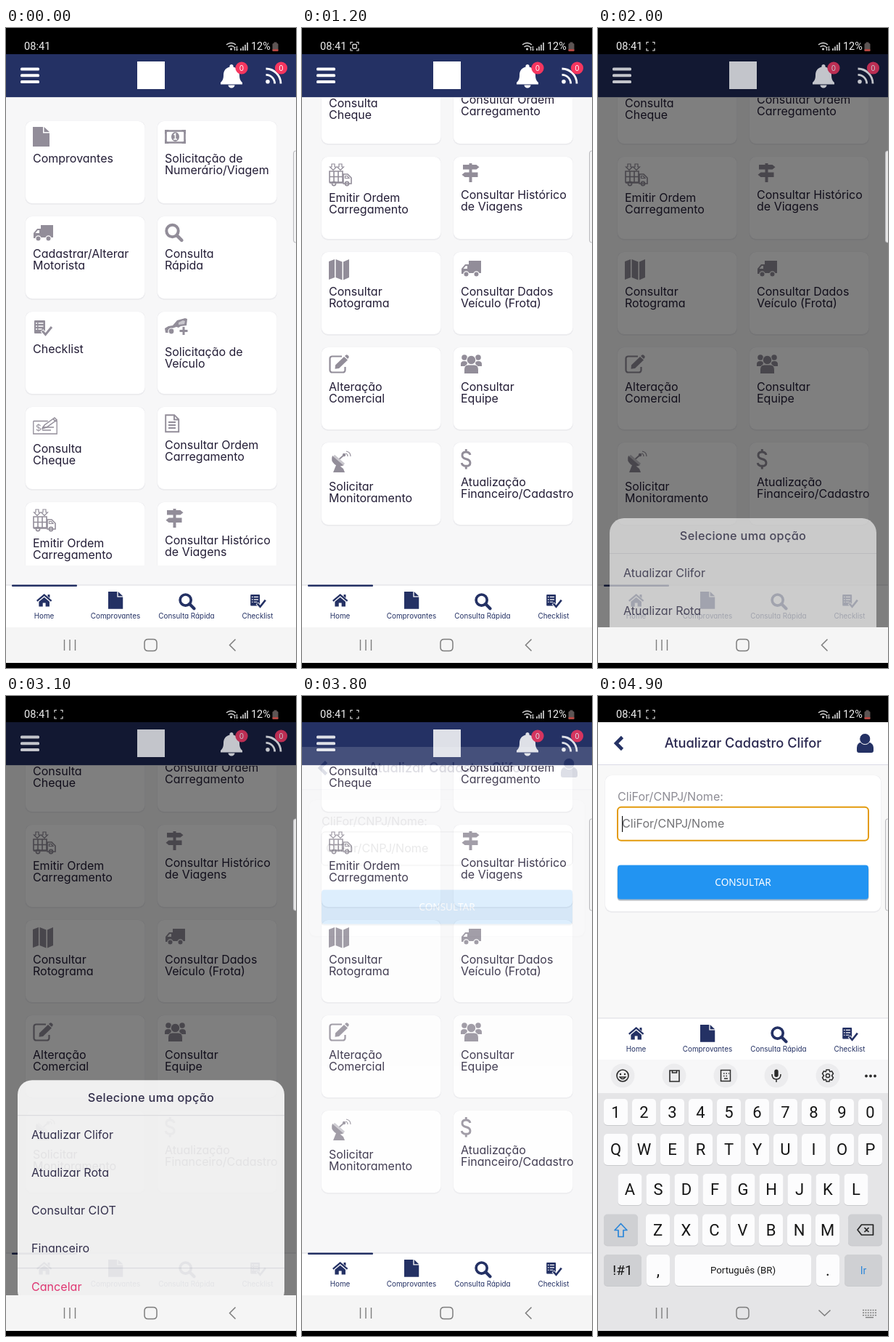
An HTML page for the animation above (5100 ms loop, 400 px wide and 880 px high).

```html
<!DOCTYPE html>
<html lang="pt-BR">
<head>
<meta charset="utf-8">
<title>App</title>
<style>
html, body { margin: 0; width: 100%; height: 100%; overflow: hidden; background: #000; }
svg { display: block; width: 100vw; height: 100vh; fill: currentColor; }
text { font-family: Inter, "Open Sans", sans-serif; font-feature-settings: "cv11"; white-space: pre; }
.sys { font-family: Roboto, "Noto Sans", sans-serif; }
.noto { font-family: "Noto Sans", "Open Sans", sans-serif; }
.mid { text-anchor: middle; }
.med { font-weight: 500; }
.o { fill: none; stroke: currentColor; }
</style>
</head>
<body>
<svg id="stage" viewBox="0 0 400 880" xmlns="http://www.w3.org/2000/svg"></svg>
<script>
const NAVY = '#243164', GREY = '#928d99', INK = '#231d36', PAGE = '#f7f7f8';
const LOOP = 5100, STEP = 100;

const rect = (x, y, w, h, r, fill, more = '') =>
  `<rect x="${x}" y="${y}" width="${w}" height="${h}" rx="${r}" fill="${fill}" ${more}/>`;
const dot = (x, y, r, fill = 'currentColor', more = '') =>
  `<circle cx="${x}" cy="${y}" r="${r}" fill="${fill}" ${more}/>`;
const shape = (d, more = '') => `<path d="${d}" ${more}/>`;
const line = (d, w = 2, more = '') => `<path class="o" d="${d}" stroke-width="${w}" ${more}/>`;
const ring = (x, y, r, w) => `<circle class="o" cx="${x}" cy="${y}" r="${r}" stroke-width="${w}"/>`;
const text = (x, y, s, size, fill, cls = '', more = '') =>
  `<text x="${x}" y="${y}" font-size="${size}" fill="${fill}" class="${cls}" ${more}>${s}</text>`;
const put = (x, y, color, body, k = 1) =>
  `<g transform="translate(${x} ${y}) scale(${k})" color="${color}">${body}</g>`;
const layer = (id, body) => `<g id="${id}">${body}</g>`;
const card = (x, y, w, h) =>
  rect(x - .5, y - .3, w + 1, h + 2, 9, '#ebebee') + rect(x, y, w, h, 9, '#fff');
const wheel = (x, y, r = 3.2) => dot(x, y, r, 'currentColor', 'stroke="#fff" stroke-width="1.2"');

const icon = {
  file: shape('M0 0h14v8.500h9V27H0zM15.500 0l7.500 7h-7.500z'),
  money: line('M1.500 5.500h26v16h-26z', 2.6) + shape('M0 4h6l-6 6zM29 4h-6l6 6zM0 23h6l-6-6zM29 23h-6l6-6z') +
    `<ellipse cx="14.500" cy="13.500" rx="5.500" ry="6.500"/>` + line('M12.500 11l2-1.500v7.500m-2.500 0h5', 1.6, 'style="stroke:#fff"'),
  truck: shape('M11 4h17v17H11zM10 9H6l-5 6v7h10V9z') + shape('M3.500 15l3.300-4H9v4z', 'fill="#fff"') +
    wheel(7.5, 22.5, 3.6) + wheel(21.5, 22.5, 3.6),
  search: ring(10.5, 12, 8.2, 4) + line('M16.500 18l6.800 6.800', 4.6, 'stroke-linecap="round"'),
  list: rect(2, 4, 15, 18, 1, 'currentColor') +
    line('M4 8h2m1.500 0h7M4 12h2m1.500 0h7M4 16h2m1.500 0h5', 1.4, 'style="stroke:#fff"') +
    line('M12.500 18l5 5.500 9-11', 5, 'style="stroke:#fff"') + line('M13 18.500l4.500 5 8.500-10.500', 3),
  car: shape('M0 15l5-3 6-1 6-7 11-3 3 1-1 9-8 1-3 2-3-1-6 2v6H1z') + wheel(9, 19, 4) +
    shape('M19 7l6-3 3 1-1 4-8 1z', 'fill="#c9c7cd"') + line('M26 13v11m-5.500-5.500h11', 3),
  cheque: line('M.800 11.500h20m9 0h3.400V29H.800V11.500M13 20h16M13 24h12', 1.3) +
    line('M13 22l3-5L30 7l3 3-14 10zM28 8.500l3 3', 1.5) + text(4, 25, '$', 12, 'currentColor'),
  doc: line('M1.200 3.200h12l6 6v17h-18zM13 3.500V9.500h6M5 13h10M5 17h10M5 21h10', 1.9),
  load: line('M1 12h18v15H1zM1 19.500h18M7 12v15M13 12v15M20 16h6l5 5v8H20zM1 28h18', 1.6) +
    shape('M4 2h4v4h2.500L6 10.500 1.500 6H4zM14 2h4v4h2.500L16 10.500 11.500 6H14z', 'class="o" stroke-width="1.2"') +
    line('M22.500 18.500h3l2.500 3h-5.500z', 1.2) + ring(7, 29, 2.6, 1.6) + ring(25, 29, 2.6, 1.6),
  sign: shape('M11.500 1h4v26h-4z') + shape('M3 3h18.500l4 3.200-4 3.300H3zM23.500 13.500H5.500l-4 3.200 4 3.300h18z'),
  map: shape('M0 5l8-3v25l-8 3zM9.500 2l9 3.500v25l-9-3.500zM20 5.500l8-3.500v25l-8 3.500z'),
  edit: line('M18 4.500H4.500a3 3 0 0 0-3 3v16a3 3 0 0 0 3 3h15a3 3 0 0 0 3-3V19', 2.2) +
    shape('M9 16.500L21 5l5 4.500L14 21l-5.500.800zM22 4l1.700-1.500q1.200-.700 2.300.300l1.300 1.300q1 1.200 0 2.300L26 8z'),
  team: dot(5, 6, 3.8) + dot(24, 6, 3.8) + shape('M0 18v-3q0-4 5-4 3 0 4 2l-1 5zM29 18v-3q0-4-5-4-3 0-4 2l1 5z') +
    dot(14.5, 9.5, 6.2, 'currentColor', 'stroke="#fff"') +
    shape('M4.500 28.500V23q0-7 6-7h8q6 0 6 7v5.500z', 'stroke="#fff" stroke-width="1"'),
  dish: shape('M5 10q-3 7 3 12 6 4.500 13 1zM10 23l-4 10h16l-2-5-5-4z') + line('M13 16l8-7', 1.8) + dot(21, 9, 2.2) +
    line('M7 10l14 12', 3, 'style="stroke:#c9c7cd"') + line('M23 7q3 .500 3 4M24 4q6 1 6 7', 1.2),
  dollar: line('M13 9q-1-4-5.800-4Q2 5 2 9.500q0 3.700 5 5 6 1.300 6 5.500 0 4.300-5.500 4.300-5.500 0-6.300-4.300M7.300 1v4m0 19v4.500', 2.9),
  home: shape('M11 0l11 9.300-1.500 1.700L11 3 1.500 11 0 9.300zM11 4.800l7.500 6.300V18H13v-5H9v5H3.500v-6.900zM16 1h3v5l-3-2.500z')
};

// icon, first baseline, lines
const cards = [
  ['file', 57, 'Comprovantes'], ['money', 57, 'Solicitação de', 'Numerário/Viagem'],
  ['truck', 57, 'Cadastrar/Alterar', 'Motorista'], ['search', 57, 'Consulta', 'Rápida'],
  ['list', 57, 'Checklist'], ['car', 61, 'Solicitação de', 'Veículo'],
  ['cheque', 63, 'Consulta', 'Cheque'], ['doc', 58, 'Consultar Ordem', 'Carregamento'],
  ['load', 62, 'Emitir Ordem', 'Carregamento'], ['sign', 58, 'Consultar Histórico', 'de Viagens'],
  ['map', 60, 'Consultar', 'Rotograma'], ['truck', 60, 'Consultar Dados', 'Veículo (Frota)'],
  ['edit', 60, 'Alteração', 'Comercial'], ['team', 60, 'Consultar', 'Equipe'],
  ['dish', 66, 'Solicitar', 'Monitoramento'], ['dollar', 60, 'Atualização', 'Financeiro/Cadastro']
];
const menu = cards.map(([name, base, ...rows], i) => {
  const x = i % 2 ? 209 : 27, y = 128 + (i >> 1) * 131;
  return card(x, y, 164.5, 113) + put(x + 10, y + 8, GREY, icon[name]) +
    rows.map((s, n) => text(x + 10, y + base + n * 15.6, s, 16, INK)).join('');
}).join('');

const badge = x => dot(x, 55, 8.6, '#f5365f') + text(x, 58.6, '0', 10, '#fff', 'mid');
const headIcons = put(0, 0, '#fff',
  [54.5, 63.2, 72].map(y => rect(20, y, 26, 4, 1.5, '#fff')).join('') +
  rect(181, 46, 38, 38, 0, '#fff') +
  shape('M311 50a3 3 0 0 1 2.500 3.500c6 1.500 8.500 6 8.500 11.500 0 6 2 8 4 10v2.500h-30V75c2-2 4-4 4-10 0-5.500 2.500-10 8.500-11.500A3 3 0 0 1 311 50zM306.500 78.500h9a4.500 4 0 0 1-9 0z') +
  dot(361, 73.8, 2.8) + line('M358.500 64.300a12.200 12.200 0 0 1 12.200 12.200M358.500 56a20.500 20.500 0 0 1 20.500 20.500', 2.8) +
  badge(325) + badge(379.5));

const homePage = rect(0, 36, 400, 790, 0, PAGE) +
  `<g clip-path="url(#list)">${layer('menu', menu)}</g>` +
  rect(0, 36, 400, 60, 0, '#dcdde6') + rect(0, 36, 400, 59, 0, NAVY);

const formPage = rect(0, 36, 400, 840, 0, '#f8f8f8') + rect(0, 36, 400, 58, 0, '#fff') +
  rect(0, 94, 400, 1, 0, '#dadae6') +
  put(0, 0, NAVY, line('M33.500 56.500l-8.500 8.500 8.500 8.500', 4.6) +
    shape('M357 75v-4q0-6 6-7.500h10q7 1.500 7 7.500v4q0 3-3 3h-17q-3 0-3-3z') + dot(368.3, 59, 7.6, 'currentColor', 'stroke="#fff"')) +
  text(200, 71, 'Atualizar Cadastro Clifor', 18.3, '#2a2850', 'mid med') +
  card(10, 109, 380, 187) +
  text(27, 144, 'CliFor/CNPJ/Nome:', 16.1, '#8e8d95') +
  rect(27, 152.8, 346, 46, 5, '#fff', 'id="field"') +
  text(33, 181, 'CliFor/CNPJ/Nome', 16.1, '#747477') +
  rect(33, 165, 1.2, 22, 0, '#111', 'id="caret"') +
  rect(26.5, 234, 347, 47.5, 4.5, '#b5bcc4') + rect(27, 232.5, 346, 47, 4, '#2294f2') +
  text(200, 261, 'CONSULTAR', 13.6, '#fff', 'mid noto');

const tab = (x, s) => text(x, 811.7, s, 9.9, NAVY, 'mid');
const tabs = rect(0, 766, 400, 60, 0, '#fff') + rect(0, 765.5, 400, 1, 0, '#dcdce2') +
  rect(8, 765.5, 90, 2.5, 1, NAVY, 'id="mark"') +
  put(42, 778, NAVY, icon.home, .97) + put(141, 775, NAVY, icon.file, .88) +
  put(238, 775.5, NAVY, icon.search, .92) + put(335.5, 775.5, NAVY, icon.list, .86) +
  tab(52.5, 'Home') + tab(151, 'Comprovantes') + tab(249, 'Consulta Rápida') + tab(347, 'Checklist');

const SHEET_Y = 498, SHEET_H = 310;
const options = ['Atualizar Clifor', 'Atualizar Rota', 'Consultar CIOT', 'Financeiro'];
const sheet = rect(16, SHEET_Y, 368, SHEET_H, 20, '#fff') +
  text(200, SHEET_Y + 30, 'Selecione uma opção', 16.3, '#2a2646', 'mid med', 'letter-spacing=".3"') +
  rect(16, SHEET_Y + 48, 368, 1, 0, '#e3e3e8') + rect(16, SHEET_Y + 258, 368, 1, 0, '#e3e3e8') +
  options.map((s, i) => text(35, SHEET_Y + 80.5 + i * 52, s, 16.1, '#2a2646')).join('') +
  text(35, SHEET_Y + 290, 'Cancelar', 16.1, '#ee2f72');

const key = (x, y, w, h, s = '', fill = '#fcfcfd', size = 22, color = '#161616') =>
  rect(x, y + 1, w, h, 5, '#c9cacd') + rect(x, y, w, h, 5, fill) +
  text(x + w / 2, y + h / 2 + size * .36, s, size, color, 'mid sys');
const keyRow = (s, x, y, h) => [...s].map((c, i) => key(x + i * 39, y, 33, h, c)).join('');
const toolIcons = ring(34, 522, 8, 1.6) + dot(31, 520, 1.2) + dot(37, 520, 1.2) + line('M30 524q4 5 8 0z', 1.4) +
  line('M99 515h13v15H99zM102.500 515v3h6v-3', 1.6) +
  line('M169.500 514.500h13v15h-13zM173 519h1.500m2 0h1.500m2 0h1M173 522.500h1.500m2 0h1.500M174 526h5', 1.5) +
  rect(243.3, 513.5, 5.4, 10.5, 2.7, 'currentColor') + line('M240 520q0 7 6 7t6-7M246 527v4', 1.5) +
  ring(317, 522, 2.6, 1.5) + line('M315 514h4l.800 2.600 2.700-.800 2 3.500-2 2.700 2 2.700-2 3.500-2.700-.800-.800 2.600h-4l-.800-2.600-2.700.800-2-3.500 2-2.700-2-2.700 2-3.500 2.700.800z', 1.5) +
  dot(370, 522.5, 1.9) + dot(376, 522.5, 1.9) + dot(382, 522.5, 1.9);
const keyboard = rect(0, 500, 400, 374, 0, '#e5e5e7') + rect(0, 500, 400, 46, 0, '#f7f7f8') +
  [34, 105, 176, 246, 317].map(x => dot(x, 522, 16.5, '#ececee')).join('') + put(0, 0, '#2b2b2b', toolIcons) +
  keyRow('1234567890', 8, 554, 36) + keyRow('QWERTYUIOP', 8, 602, 43) +
  keyRow('ASDFGHJKL', 27.5, 657, 43) + keyRow('ZXCVBNM', 66, 712.5, 43) +
  key(8, 712.5, 47, 43, '', '#cfd0d3') + key(345, 712.5, 47, 43, '', '#cfd0d3') +
  key(8, 768, 52, 43, '!#1', '#cfd0d3', 19) + key(67, 768, 32, 43, ',') +
  key(106, 768, 188, 43, 'Português (BR)', '#fcfcfd', 13.3) + key(301, 768, 32, 43, '.') +
  key(340, 768, 52, 43, 'Ir', '#cfd0d3', 14, '#2b86d9') +
  put(0, 0, '#2b86d9', line('M31.500 725.500l8.500 9h-5v9h-7v-9h-5z', 1.7, 'stroke-linejoin="round"')) +
  put(0, 0, '#222', line('M358 734l5.500-7h16v14h-16zM367.500 731l6 6m0-6l-6 6', 1.7, 'stroke-linejoin="round"'));

const navBar = rect(0, 824, 400, 50, 0, '#f5f5f5', 'id="navBack"') +
  put(0, 0, '#7d7d7d',
    line('M80.500 841v15M88 841v15M95.500 841v15', 1.4) +
    line('M196 840.500h7q5 0 5 5v6q0 5-5 5h-7q-5 0-5-5v-6q0-5 5-5z', 1.5) +
    layer('back', line('M316.500 840.500l-8 8 8 8', 1.5)) +
    layer('down', line('M304.500 844.500l8 7.500 8-7.500', 1.5) +
      line('M365 844.500h19M365 848h19M365 851.500h19', 1.6, 'stroke-dasharray="2 1.400"') + line('M369 854.500h11', 1.4))) +
  rect(0, 873, 400, 7, 0, '#000');

const statusBar = rect(0, 0, 400, 36, 0, '#000') + text(25, 30, '08:41', 14.6, '#eee', 'sys') +
  put(0, 0, '#ddd',
    layer('rec', line('M67 22.500v-3h3M75 19.500h3v3M78 28v3h-3M70 31h-3v-3', 1.2) +
      layer('recDot', rect(69.8, 22.5, 5.5, 5.5, 1, 'none', 'stroke="#ddd" stroke-width="1.3"'))) +
    line('M304 23q6.500-5 13 0M306.500 26q4-3.200 8 0', 1.5) + dot(310.5, 29, 1.5) +
    line('M315.500 31v-5m-1.500 1.500l1.500-1.500 1.500 1.500M318.500 25v6m-1.500-1.500l1.500 1.500 1.500-1.500', 1) +
    line('M324 31v-3M327 31v-5.500M330 31v-8', 1.6) + line('M333 31V20', 1.6)) +
  text(338, 30, '12%', 14.4, '#eee', 'sys') +
  rect(367.5, 21, 8, 11, 1.5, '#5d5554') + rect(369.5, 19.5, 4, 2, 0, '#5d5554') + rect(367.5, 29, 8, 3, 1, '#b54742');

const stage = document.getElementById('stage');
stage.innerHTML = '<defs><clipPath id="list"><rect y="95" width="400" height="644"/></clipPath></defs>' +
  layer('home', homePage) + layer('form', formPage) + layer('tabs', tabs) +
  rect(0, 36, 400, 788, 0, '#000', 'id="dim"') + layer('headIcons', headIcons) +
  layer('sheet', sheet) + layer('keys', keyboard) + navBar + statusBar +
  rect(396.5, 169, 8, 126, 3, '#f3f3f4', 'stroke="#b9b9bd" stroke-width="1" id="handle"');

const el = id => document.getElementById(id);
const set = (id, attrs) => { for (const k in attrs) el(id).setAttribute(k, attrs[k]); };
const show = (id, on) => set(id, { visibility: on ? 'visible' : 'hidden' });
const span = (t, from, to) => Math.min(1, Math.max(0, (t - from) / (to - from)));
const smooth = p => p * p * (3 - 2 * p);

function draw(t) {
  set('menu', { transform: `translate(0 ${-475 * smooth(span(t, 130, 400))})` });

  const open = span(t, 1800, 2150), close = span(t, 3050, 3350);
  const drop = 1 - open ** 1.5 + close ** 1.3;
  const dim = span(t, 1650, 1900) * (1 - span(t, 3100, 3400) ** 1.2);
  set('sheet', { transform: `translate(0 ${SHEET_H * drop})`, opacity: open ** .9 * (1 - close ** 1.2) });
  set('dim', { opacity: .5 * dim });
  set('handle', { fill: dim > .5 ? '#e6e6e6' : '#f3f3f4' });

  const page = smooth(span(t, 3720, 4050));
  set('form', { opacity: page, transform: `translate(0 ${40 * (1 - page)})` });
  set('headIcons', { opacity: (1 - .25 * dim) * (1 - page) });
  show('mark', page < .5);

  const focus = t >= 4400;
  set('field', { stroke: focus ? '#e39a0c' : '#a3a3a8', 'stroke-width': focus ? 2 : 1 });
  show('caret', t >= 4900);

  const rise = 1 - (1 - span(t, 4350, 4700)) ** 2, up = rise === 1;
  set('keys', { transform: `translate(0 ${374 * (1 - rise)})` });
  show('keys', rise > 0);
  set('tabs', { transform: `translate(0 ${up ? -323 : 0})` });
  set('navBack', { fill: rise > 0 ? '#e5e5e7' : '#f5f5f5' });
  show('back', rise === 0);
  show('down', rise > 0);

  const blink = Math.floor((t - 200) / 500);
  show('rec', t >= 200);
  show('recDot', t >= 200 && blink % 2 === 0);
}

function tick(now) {
  draw(Math.floor(now % LOOP / STEP) * STEP);
  requestAnimationFrame(tick);
}
draw(0);
requestAnimationFrame(tick);
</script>
</body>
</html>
```
